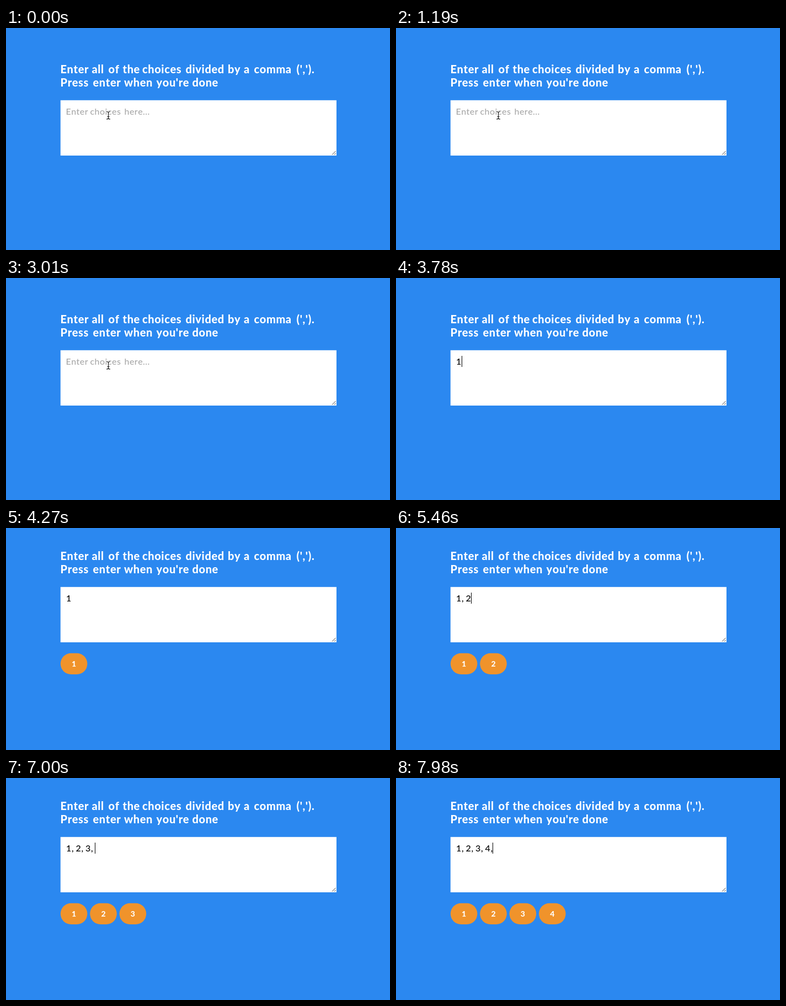
Recreate the animation shown at these times as an HTML page. Size 696 by 402 pixels, loop 8000 ms.

```html
<!DOCTYPE html>
<html lang="en">
<head>
<meta charset="utf-8">
<title>Choice picker</title>
<style>
  html, body { margin: 0; width: 100%; height: 100%; overflow: hidden; background: #2b88f0; }
  svg { display: block; width: 696px; height: 402px; }
  text { font-family: Lato, "Open Sans", sans-serif; font-kerning: none; white-space: pre; }
  .title { font-size: 20px; font-weight: 800; letter-spacing: .6px; fill: #fff; }
  .hint { font-size: 16px; font-weight: 500; letter-spacing: .45px; fill: #a9a9a9; }
  .typed { font-size: 16px; font-weight: 500; fill: #000; }
  .tag rect { fill: #f0932b; }
  .tag text { font-size: 14px; font-weight: 800; fill: #fff; text-anchor: middle; }
  .beam { fill: none; stroke-linecap: square; }
</style>
</head>
<body>
<svg viewBox="0 0 696 402">
  <defs>
    <path id="beam" d="M182.5 151.5q3 0 3 2v9.5q0 2-3 2M188.5 151.5q-3 0-3 2v9.5q0 2 3 2M184 160.5h3"/>
  </defs>
  <g id="panel">
    <g id="title" class="title"></g>
    <rect x="98.8" y="130.8" width="500.2" height="100.2" fill="#fff"/>
    <path d="M591 229.5l6.5-6.5M595 229.5l2.5-2.5" stroke="#444" stroke-width="1"/>
    <g id="idle">
      <g id="hint" class="hint"></g>
      <g class="beam">
        <use href="#beam" stroke="#fff" stroke-width="2.6"/>
        <use href="#beam" stroke="#111" stroke-width="1.1"/>
      </g>
    </g>
    <text id="typed" class="typed" y="157"></text>
    <rect id="caret" y="141" width="1" height="20" fill="#000" shape-rendering="crispEdges"/>
    <g id="tags"></g>
  </g>
</svg>
<script>
const LOOP = 8000, KEYUP = 140, BLINK = 500, LEFT = 109;
const TEXT = '1, 2, 3, 4,';
const KEYS = [3710, 4620, 4830, 5250, 5740, 5950, 6300, 6650, 6860, 7280, 7840];
const $ = id => document.getElementById(id);

function add(parent, name, attrs, text = '') {
  const el = document.createElementNS('http://www.w3.org/2000/svg', name);
  for (const key in attrs) el.setAttribute(key, attrs[key]);
  el.textContent = text;
  return parent.appendChild(el);
}

function addLine(parent, y, line, starts) {
  const text = add(parent, 'text', { y });
  line.split(' ').forEach((word, i, all) =>
    add(text, 'tspan', { x: starts[i] }, i < all.length - 1 ? word + ' ' : word));
}

addLine($('title'), 82, "Enter all of the choices divided by a comma (',').",
  [98.5, 155.5, 185.5, 211.5, 247, 325.5, 402, 431, 449.5, 526.5]);
addLine($('title'), 106, "Press enter when you're done", [98.5, 157.5, 214, 272.5, 337.5]);
addLine($('hint'), 157, 'Enter choices here...', [108.5, 152.5, 214.5]);

// Horizontal start of each typed character, plus the final caret stop
const stops = [LEFT];
for (const c of TEXT) stops.push(stops.at(-1) + (c === ',' ? 4 : c === ' ' ? 3.5 : 10));

const tags = [];
[...TEXT].forEach((c, i) => {
  if (!/\d/.test(c)) return;
  const x = 98.8 + tags.length * 53.4;
  const el = add($('tags'), 'g', { class: 'tag' });
  add(el, 'rect', { x, y: 250.7, width: 48.6, height: 38.3, rx: 19.15 });
  add(el, 'text', { x: x + 24.3, y: 275 }, c);
  tags.push({ el, at: KEYS[i] + KEYUP });
});

const show = (el, on) => el.setAttribute('visibility', on ? 'visible' : 'hidden');
let shown = -1;

function render(t) {
  const count = KEYS.filter(k => k <= t).length;
  if (count !== shown) {
    $('typed').textContent = TEXT.slice(0, count);
    $('typed').setAttribute('x', stops.slice(0, Math.max(1, count)).join(' '));
    $('caret').setAttribute('x', Math.floor(stops[count]));
    shown = count;
  }
  show($('idle'), count === 0);
  show($('caret'), count > 0 && (t - KEYS[count - 1]) % (2 * BLINK) < BLINK);
  for (const tag of tags) show(tag.el, t >= tag.at);
  // The first tag makes the centred panel taller, which lifts it
  $('panel').setAttribute('transform', `translate(0 ${t >= tags[0].at ? -24 : 0})`);
}

const start = performance.now();
function tick() {
  render((performance.now() - start) % LOOP);
  requestAnimationFrame(tick);
}
tick();
</script>
</body>
</html>
```
